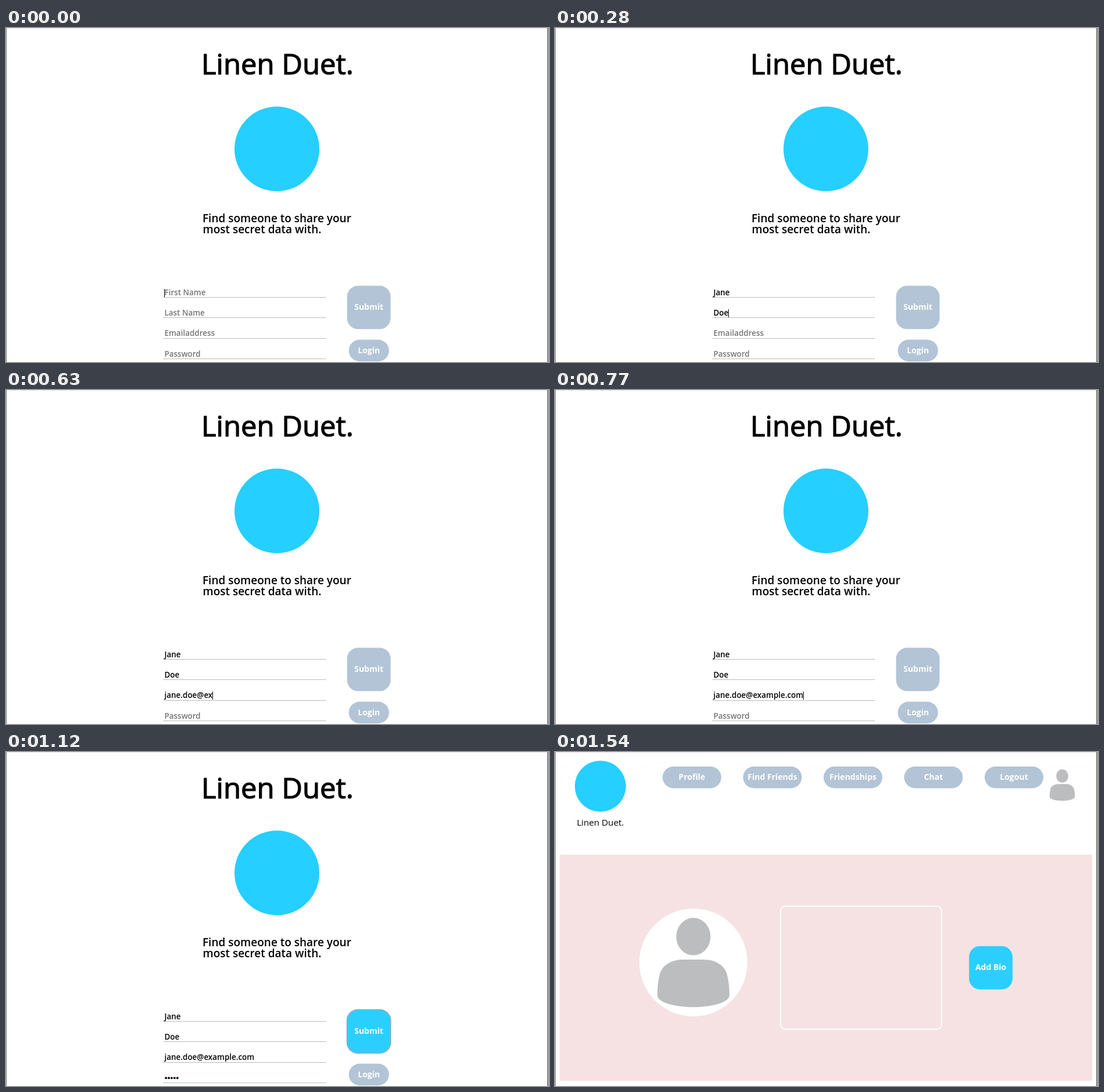
Recreate the animation shown at these times as an HTML page with a canvas. Size 934 by 576 pixels, loop 1610 ms.

```html
<!DOCTYPE html>
<html lang="en">
<head>
<meta charset="utf-8">
<title>Sign up</title>
<style>
  html, body { margin: 0; width: 100%; height: 100%; overflow: hidden; background: #fff; }
  canvas { display: block; }
</style>
</head>
<body>
<canvas id="stage" width="934" height="576"></canvas>
<script>
const ctx = document.getElementById('stage').getContext('2d');
const W = 934, H = 576, LOOP = 1610;
const BRAND = 'Linen Duet.';
const PAPER = '#fff', CYAN = '#25cfff', ACTIVE = '#2bcfff', STEEL = '#b2c4d6';
const PINK = '#f6e2e3', GREY = '#bbbdbe', HINT = '#757575';

const FIELD_X = 272.5, FIELD_Y = 464, ROW = 35.4;
// Each field: focus time, and the moments at which typed lengths appear.
const fields = [
  { hint: 'First Name', value: 'Jane', focus: 0, typed: [[70, 4]] },
  { hint: 'Last Name', value: 'Doe', focus: 210, typed: [[280, 3]] },
  { hint: 'Emailaddress', value: 'jane.doe@example.com', focus: 420,
    typed: [[490, 3], [560, 7], [630, 11], [700, 16], [770, 20]] },
  { hint: 'Password', value: '12345', secret: true, focus: 910, typed: [[980, 5]] }
];
const HOVER = 980, PRESS = 1120, BLANK = 1330, PROFILE = 1540;

function rect(x, y, w, h, color) {
  ctx.fillStyle = color;
  ctx.fillRect(x, y, w, h);
}

function ellipse(x, y, rx, ry, color) {
  ctx.fillStyle = color;
  ctx.beginPath();
  ctx.ellipse(x, y, rx, ry, 0, 0, Math.PI * 2);
  ctx.fill();
}

function roundBox(x, y, w, h, r) {
  ctx.beginPath();
  ctx.roundRect(x, y, w, h, r);
}

function text(str, x, y, size, weight, color, align = 'left') {
  ctx.font = `${weight} ${size}px "Open Sans", "Noto Sans", sans-serif`;
  ctx.textAlign = align;
  ctx.fillStyle = color;
  ctx.fillText(str, x, y);
}

function button(label, x, y, w, h, color, r = h / 2) {
  ctx.fillStyle = color;
  roundBox(x, y, w, h, r);
  ctx.fill();
  text(label, x + w / 2, y + h / 2 + 4.2, 14, 700, '#fff', 'center');
}

function drawHeading() {
  text(BRAND, 467, 79.5, 49, 400, '#000', 'center');
  // A thin round outline softens the corners and thickens the strokes.
  ctx.strokeStyle = '#000';
  ctx.lineWidth = 1.2;
  ctx.lineJoin = 'round';
  ctx.strokeText(BRAND, 467, 79.5);
}

function drawField(field, row, t) {
  const line = Math.round(FIELD_Y + row * ROW) + 0.5;
  const base = FIELD_Y - 3.5 + row * ROW;
  let count = 0;
  for (const [at, length] of field.typed) if (t >= at) count = length;

  ctx.strokeStyle = '#777';
  ctx.lineWidth = 1;
  ctx.setLineDash([1, 1]);
  ctx.beginPath();
  ctx.moveTo(271, line);
  ctx.lineTo(550, line);
  ctx.stroke();
  ctx.setLineDash([]);

  const shown = field.value.slice(0, count);
  let width = 0;
  if (!count) {
    text(field.hint, FIELD_X, base, 13.45, 600, HINT);
  } else if (field.secret) {
    for (let i = 0; i < count; i++) ellipse(FIELD_X + 2.7 + i * 4.9, base - 4.5, 1.9, 1.9, '#000');
    width = count * 4.9;
  } else {
    text(shown, FIELD_X, base, 13.45, 600, '#000');
    width = ctx.measureText(shown).width;
  }

  const next = fields[row + 1];
  if (t >= field.focus && t < (next ? next.focus : PRESS)) {
    rect(Math.floor(FIELD_X + width), Math.round(base - 11), 1, 14, '#000');
  }
}

function drawSignup(t) {
  drawHeading();
  ellipse(466, 208.5, 73, 73, CYAN);
  text('Find someone to share your', 338, 335, 19, 600, '#000');
  text('most secret data with.', 338.5, 354, 19, 600, '#000');
  fields.forEach((field, row) => drawField(field, row, t));

  button('Submit', 586.7, 444.5, 74.8, 74.8, t >= HOVER ? ACTIVE : STEEL, 18.7);
  if (t >= PRESS) {
    ctx.strokeStyle = '#8fabbc';
    ctx.lineWidth = 1.6;
    roundBox(586.5, 444.3, 75.2, 75.2, 18.7);
    ctx.stroke();
  }
  button('Login', 589.6, 537.6, 69.2, 37.4, STEEL);
}

function drawPerson(x, y, scale) {
  ctx.save();
  ctx.translate(x, y);
  ctx.scale(scale, scale);
  ellipse(0, 32.3, 29.5, 32.3, GREY);
  ctx.beginPath();
  ctx.moveTo(-18, 72);
  ctx.bezierCurveTo(-40, 72, -55, 84, -58, 98);
  ctx.bezierCurveTo(-61, 110, -62, 122, -62, 133);
  ctx.bezierCurveTo(-62, 148, -25, 154, 0, 154);
  ctx.bezierCurveTo(25, 154, 62, 148, 62, 133);
  ctx.bezierCurveTo(62, 122, 61, 110, 58, 98);
  ctx.bezierCurveTo(55, 84, 40, 72, 18, 72);
  ctx.fill();
  ctx.restore();
}

function drawProfile() {
  ellipse(78, 59, 44, 44, CYAN);
  text(BRAND, 78, 126.5, 15.2, 400, '#000', 'center');
  ['Profile', 'Find Friends', 'Friendships', 'Chat', 'Logout'].forEach((label, i) =>
    button(label, 185 + i * 138.5, 25, 101, 37.4, STEEL));
  drawPerson(872.5, 30, 0.352);

  rect(8, 177, 916, 390, PINK);
  ellipse(238, 363, 93, 93, '#fff');
  drawPerson(238, 286, 1);
  ctx.strokeStyle = '#fff';
  ctx.lineWidth = 2;
  roundBox(388, 266, 277, 212, 8);
  ctx.stroke();
  button('Add Bio', 712.2, 334.7, 74.8, 74.8, ACTIVE, 18.7);
}

function drawWindow(t) {
  rect(0, 0, W, H, PAPER);
  rect(0, 0, W, 1, t >= PROFILE ? '#f3dcdd' : '#e4e4e4');
  rect(0, 0, 1, H, '#777');
  rect(931, 0, 1, H, '#666');
  rect(932, 0, 2, H, '#a0a0a0');
}

function draw(t) {
  drawWindow(t);
  if (t < BLANK) drawSignup(t);
  else if (t >= PROFILE) drawProfile();
}

const start = performance.now();
function tick() {
  draw((performance.now() - start) % LOOP);
  requestAnimationFrame(tick);
}
tick();
</script>
</body>
</html>
```
